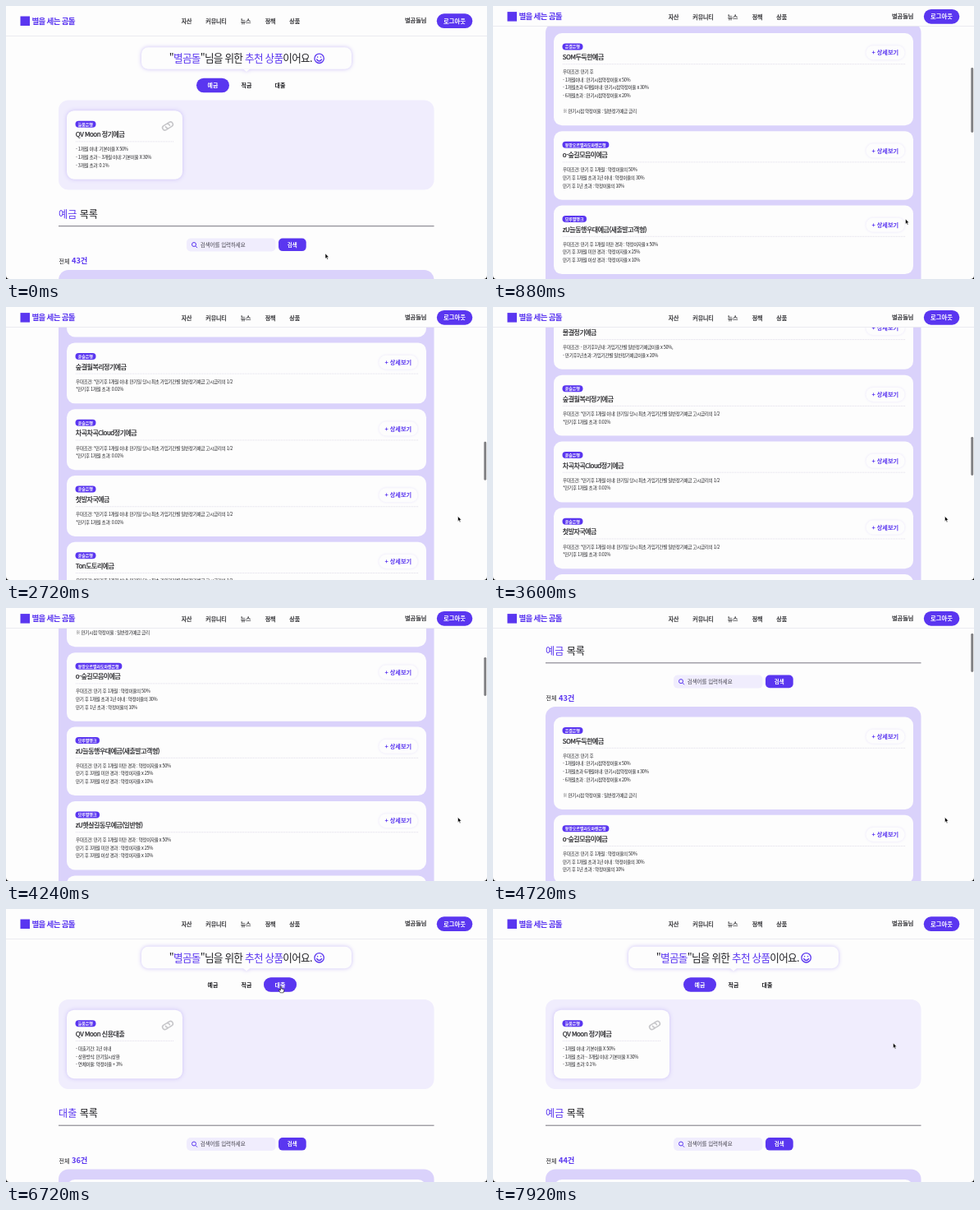
Write an HTML page that moves like this. It is 586 px wide and 332 px high and loops after 8 s.

```html
<!DOCTYPE html>
<html lang="ko">
<head>
<meta charset="utf-8">
<title>예금 추천</title>
<style>
html, body { margin: 0; width: 100%; height: 100%; overflow: hidden; background: #fdfdfd; }
svg { display: block; width: 100vw; height: 100vh; font-family: "Noto Sans CJK KR", "Noto Sans CJK", "Noto Sans", sans-serif; }
text { white-space: pre; }
.glow { filter: drop-shadow(0 0 2.5px #cbbff8); }
.soft { filter: drop-shadow(0 0 1.5px #e9e4fb); }
</style>
</head>
<body>
<svg id="stage" viewBox="0 0 586 332"></svg>
<script>
const LOOP = 8000;
const PURPLE = '#5a36f0', INK = '#202024', LILAC = '#f0edfd', LAVENDER = '#dad2fb', WHITE = '#fdfdfd';

// Markup helpers; text is placed by its vertical centre.
const rect = (x, y, w, h, r, fill, extra = '') =>
  `<rect x="${x}" y="${y}" width="${w}" height="${h}" rx="${r}" fill="${fill}" ${extra}/>`;
const text = (x, y, size, content, { fill = INK, weight = 400, gap = 0, anchor = 'start', id = '' } = {}) =>
  `<text x="${x}" y="${y + size * .37}" font-size="${size}" fill="${fill}" font-weight="${weight}" ` +
  `letter-spacing="${gap}" text-anchor="${anchor}" ${id && `id="${id}"`} ` +
  `${weight === 500 ? `stroke="${fill}" stroke-width=".22"` : ''}>${content}</text>`;
const mid = (x, y, size, content, opts) => text(x, y, size, content, { anchor: 'middle', ...opts });
const tint = s => `<tspan fill="${PURPLE}">${s}</tspan>`;
const dots = (x1, x2, y) =>
  `<path d="M${x1} ${y}H${x2}" stroke="#cbc7dc" stroke-width=".6" stroke-dasharray="1 1"/>`;

const LINE = 9.6, GAP = 6.9;
const cardHeight = ([, , lines]) => 54.7 + LINE * lines.length;

function cardBody(y, [bank, name, lines], right) {
  return rect(84.5, y + 12.5, bank.length * 4.55 + 6.8, 8, 4, PURPLE) +
    text(87.8, y + 16.5, 5, bank, { fill: '#fff', weight: 700, gap: -.08 }) +
    text(84.8, y + 29.1, 8, name, { weight: 500, gap: -.5 }) +
    dots(85, right, y + 37.7) +
    lines.map((s, i) => text(85, y + 47.2 + i * LINE, 5.6, s, { gap: -.33 })).join('');
}

function listCard(y, card) {
  return rect(74, y, 438, cardHeight(card), 10, WHITE) + cardBody(y, card, 502) +
    rect(454.5, y + 15.2, 47, 17, 8.5, WHITE, 'class="soft"') +
    mid(477.8, y + 23.7, 7.2, '+ 상세보기', { fill: PURPLE, weight: 700 });
}

// Product data
const overdue = [
  '우대조건: 만기 후 1개월 미만 경과 : 약정이자율 x 50%',
  '만기 후 3개월 미만 경과 : 약정이자율 x 25%',
  '만기 후 3개월 이상 경과 : 약정이자율 x 10%'];
const yearly = [
  '우대조건: - 만기후1년내: 가입기간별 일반정기예금이율 x 50%,',
  '- 만기후1년초과: 가입기간별 일반정기예금이율 x 20%'];
const monthly = [
  '우대조건: *만기후 1개월 이내: 만기일 당시 최초 가입기간별 일반정기예금 고시금리의 1/2',
  '*만기후 1개월 초과: 0.01%'];
const offers = (bank, lines, ...names) => names.map(name => [bank, name, lines]);
const deposits = [
  ['은결은행', 'SOM두둑한예금', [
    '우대조건: 만기 후', '- 1개월이내 : 만기시점약정이율 x 50%',
    '- 1개월초과 6개월이내: 만기시점약정이율 x 30%',
    '- 6개월초과 : 만기시점약정이율 x 20%', '',
    '※ 만기시점 약정이율 : 일반정기예금 금리']],
  ['동방오르벨라도마렌은행', 'o-숲길모음이예금', [
    '우대조건: 만기 후 1개월 : 약정이율의 50%',
    '만기 후 1개월 초과 1년 이내 : 약정이율의 30%',
    '만기 후 1년 초과 : 약정이율의 10%']],
  ...offers('모루별뱅크', overdue, 'zU늘동행우대예금(새출발고객형)', 'zU햇살길동무예금(일반형)',
    'zU햇살길동무예금(우대형)', 'zU또박이예금'),
  ...offers('솔뫼은행', yearly, 'DAWN정기예금', '온(Oan)한정 정기예금', '물결정기예금'),
  ...offers('윤슬은행', monthly, '숲결월복리정기예금', '차곡차곡Cloud정기예금', '첫발자국예금',
    'Ton도토리예금', '한걸음정기예금', '나란히정기예금'),
];
const rateSteps = [
  '- 1개월 이내: 기본이율 X 50%',
  '- 1개월 초과 ~ 3개월 이내: 기본이율 X 30%',
  '- 3개월 초과: 0.1%'];
const loanTerms = ['- 대출기간: 1년 이내', '- 상환방식: 만기일시상환', '- 연체이율: 약정이율 + 3%'];
const kinds = ['예금', '적금', '대출'];
const views = [
  { tab: 0, count: 43, name: 'QV Moon 정기예금', lines: rateSteps },
  { tab: 1, count: 58, name: 'QV Moon 자유적금', lines: rateSteps },
  { tab: 2, count: 36, name: 'QV Moon 신용대출', lines: loanTerms },
  { tab: 0, count: 44, name: 'QV Moon 정기예금', lines: rateSteps },
];

const chain = `<g transform="translate(197 141.5) rotate(-32) scale(1.12)" fill="none" stroke="#c6c6c9" stroke-width="1.4" stroke-linecap="round">
  <path id="link" d="M-1 2.6H-3.6A2.6 2.6 0 0 1-3.6-2.6H-.2A2.6 2.6 0 0 1 2.2 .6"/><use href="#link" transform="rotate(180)"/></g>`;

let listEnd = 329;
const list = deposits.map(card => {
  const y = listEnd;
  listEnd += cardHeight(card) + GAP;
  return listCard(y, card);
}).join('');

const viewMarkup = ({ tab, count, name, lines }, i) => `<g id="view${i}">` +
  cardBody(122.7, ['늘품은행', name, lines], 204) +
  text(64, 249, 12.1, tint(kinds[tab]) + ' 목록', { weight: 300 }) +
  text(80, 305.5, 9.3, count + '건', { fill: PURPLE, weight: 700, gap: -.1 }) + '</g>';

const TAB = { w: 40, h: 17.5, y: 83.2 };
const tabX = kinds.map((_, i) => 252 + 41 * i);
const tabs = kinds.map((kind, i) => {
  const pill = (fill, id) => rect(tabX[i] - TAB.w / 2, TAB.y, TAB.w, TAB.h, TAB.h / 2, fill, `id="${id + i}"`);
  return pill('#c0b0f3', 'hover') + pill(PURPLE, 'active') +
    mid(tabX[i], 92.2, 7, kind, { weight: 700, id: 'tab' + i });
}).join('');

const hero =
  `<g class="glow">${rect(165, 45.8, 256, 26.4, 8, WHITE)}<path d="M289 72L293 75.5L297 72Z" fill="${WHITE}"/></g>` +
  text(198.8, 59.2, 12.6, `"${tint('별곰돌')}"님을 위한 ${tint('추천 상품')}이어요.`, { weight: 300, gap: -.72 }) +
  `<g transform="translate(381.6 59.3)" fill="none" stroke="${PURPLE}" stroke-width="1.3" stroke-linecap="round">` +
  '<circle r="5.7"/><path d="M-3 1.2Q0 5.2 3 1.2M-2-1.8V-1.5M2-1.8V-1.5"/></g>';

const search =
  '<path d="M64 263.2H521.5" stroke="#77747f" stroke-width="1"/>' +
  rect(220, 278, 108.5, 16, 5, LILAC) + rect(332, 278, 33.7, 15.6, 5, PURPLE) +
  `<g fill="none" stroke="${PURPLE}"><path d="M231 287.6L233 289.6"/><circle cx="229" cy="285.5" r="2.5"/></g>` +
  text(236.8, 286, 6.5, '검색어를 입력하세요', { fill: '#45434d', gap: -.08 }) +
  mid(348.8, 286, 6.5, '검색', { fill: '#fff', weight: 700 }) + text(64.5, 306, 7, '전체');

const menu = [['자산', 220], ['커뮤니티', 256], ['뉴스', 292], ['정책', 322], ['상품', 351.7]]
  .map(([s, x]) => mid(x, 18.4, 7, s, { weight: 500, gap: -.1 })).join('');

const header =
  `<g id="bar">${rect(0, -20, 586, 56.5, 0, WHITE)}<path d="M0 36.5H586" stroke="#e8e7ee" stroke-width=".8"/></g><g id="menu">` +
  rect(17.5, 12.5, 11.5, 11.5, 0, PURPLE) +
  text(31.5, 18.3, 9.6, '별을 세는 곰돌', { fill: PURPLE, weight: 900, gap: -.75 }) + menu +
  text(486, 17.6, 7.2, '별곰돌님', { weight: 500 }) +
  rect(524.8, 9.3, 43.5, 17.8, 8.9, PURPLE) +
  mid(546.5, 18.2, 7.3, '로그아웃', { fill: '#fff', weight: 700 }) + '</g>';

const pointer =
  '<g id="pointer"><path id="arrow" d="M0 0V6.2L1.4 4.9L2.4 7.2L3.4 6.8L2.4 4.5H4.3Z" fill="#000" stroke="#fff" stroke-width=".5"/>' +
  '<path id="hand" d="M-.6 .4Q0-.4 .6 .4V3L3.4 3.6Q4 4 3.8 5L3 7.8H-.8L-2.8 4.6Q-2.4 3.6-.6 5Z" fill="#fff" stroke="#000" stroke-width=".6"/></g>';

const stage = document.getElementById('stage');
stage.innerHTML = '<g id="page">' + hero + tabs + rect(64, 110, 457.5, 109, 12, LILAC) +
  rect(74, 122.7, 141, 83.5, 9, WHITE, 'class="glow"') + chain + search +
  views.map(viewMarkup).join('') +
  rect(64, 316.5, 457.5, listEnd - 311.5, 12, LAVENDER) + list + '</g>' + header +
  rect(582.3, 0, 2.9, 48, 1.4, '#7f7f82', 'id="thumb"') +
  '<path d="M0 328V332H4Q0 332 0 328ZM586 328V332H582Q586 332 586 328Z" fill="#000"/>' + pointer;
const el = Object.fromEntries([...stage.querySelectorAll('[id]')].map(n => [n.id, n]));

// Progress of an eased move, 0 before it starts and 1 once it is over.
function ease(t, start, duration) {
  const u = Math.min(1, Math.max(0, (t - start) / duration));
  return u * u * (3 - 2 * u);
}

// Each flick: start, duration, distance
const flicks = [[80, 800, 300.5], [880, 720, 434], [1840, 1280, 480], [3360, 880, -816], [4240, 960, -394]];
const scrollAt = t => flicks.reduce((y, [start, time, d]) => y + d * ease(t, start, time), -4.5);

// Each pointer move: start, duration, destination
const moves = [
  [80, 800, 502.5, 259], [880, 600, 550.5, 254.5], [5080, 360, 300, 97],
  [5950, 300, 335, 94], [6750, 300, 254, 92], [7640, 140, 335, 94], [7780, 140, 487.5, 163]];
const pointerAt = t => moves.reduce(([x, y], [start, time, toX, toY]) => {
  const p = ease(t, start, time);
  return [x + (toX - x) * p, y + (toY - y) * p];
}, [389, 301]);

const tabUnder = t => {
  const [x, y] = pointerAt(t);
  return y > TAB.y && y < TAB.y + TAB.h ? tabX.findIndex(c => Math.abs(x - c) < TAB.w / 2) : -1;
};

// Hover fades by averaging where the pointer has just been.
const FADE = 120, SAMPLES = 10;
const recentTabs = t => Array.from({ length: SAMPLES }, (_, k) => tabUnder(t - k * FADE / SAMPLES));

const clicks = [5720, 6420, 7270];
const move = (node, x, y) => node.setAttribute('transform', `translate(${x} ${y})`);
const show = (node, on) => node.setAttribute('display', on ? 'inline' : 'none');

function draw(t) {
  const y = scrollAt(t), compact = ease(y, 0, 30);
  move(el.page, 0, -y);
  move(el.bar, 0, -12 * compact);
  move(el.menu, 0, -5.4 * compact);

  const current = clicks.filter(c => t >= c).length;
  const turn = current ? ease(t, clicks[current - 1], 180) : 1;
  const previous = views[Math.max(0, current - 1)].tab;
  const recent = recentTabs(t);
  views.forEach((_, i) => show(el['view' + i], i === current));
  kinds.forEach((_, i) => {
    const on = i === views[current].tab ? turn : i === previous ? 1 - turn : 0;
    el['hover' + i].setAttribute('opacity', recent.filter(n => n === i).length / SAMPLES);
    el['active' + i].setAttribute('opacity', on);
    el['tab' + i].setAttribute('fill', on > .5 ? '#fff' : INK);
  });

  // The page grows once the second batch of products arrives.
  const pageHeight = t < 2100 ? 1330 : 2230, track = 328;
  el.thumb.setAttribute('y', 2 + Math.max(0, y) * track / pageHeight);
  el.thumb.setAttribute('height', 320 * track / pageHeight);
  el.thumb.setAttribute('opacity', ease(t, 40, 100) - ease(t, 5700, 250));

  move(el.pointer, ...pointerAt(t));
  show(el.hand, recent[0] >= 0);
  show(el.arrow, recent[0] < 0);
}

const start = performance.now();
function tick() {
  draw((performance.now() - start) % LOOP);
  requestAnimationFrame(tick);
}
tick();
</script>
</body>
</html>
```
